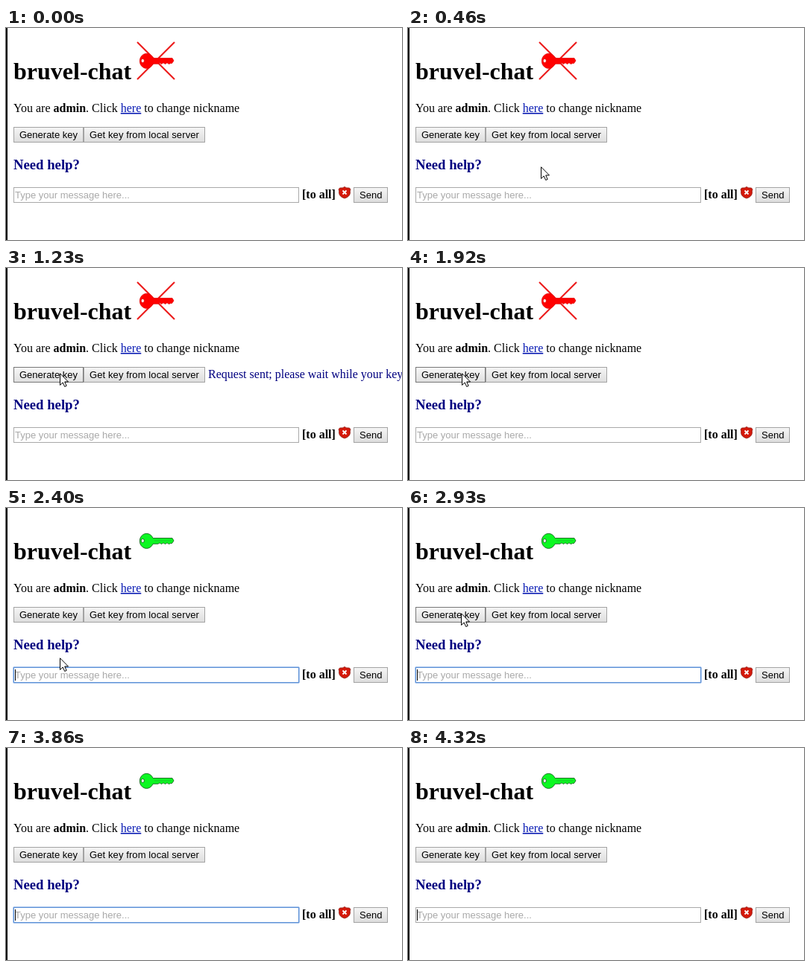
These frames come from a looping animation (531 px wide and 285 px high, 4.4 s). An HTML page:

```html
<!DOCTYPE html>
<html lang="en">
<head>
<meta charset="utf-8">
<title>Chat key demo</title>
<style>
  html, body { margin: 0; width: 100%; height: 100%; overflow: hidden; background: #fff; }
  svg { display: block; }
  text { font: 16px "Liberation Serif", "Times New Roman", serif; white-space: pre; }
  .bold { font-weight: bold; }
  .title { font-size: 32px; font-weight: bold; }
  .subtitle { font-size: 18.72px; font-weight: bold; }
  .navy { fill: #000080; }
  .link { fill: #0a1cb4; text-decoration: underline 1px; }
  .ui { font: 13px "Liberation Sans", Arial, sans-serif; }
  .wide { letter-spacing: .1px; }
  .hint { fill: #a9a9a9; }
  .button { fill: url(#face); stroke: #a3a3a3; }
  .button.hover { fill: url(#faceHover); stroke: #777; }
  .button.pressed { fill: url(#facePressed); stroke: #777; }
</style>
</head>
<body>
<svg width="531" height="285" viewBox="0 0 531 285">
  <defs>
    <linearGradient id="face" x2="0" y2="1"><stop stop-color="#f5f5f5"/><stop offset="1" stop-color="#dddddd"/></linearGradient>
    <linearGradient id="faceHover" x2="0" y2="1"><stop stop-color="#f8f8f8"/><stop offset="1" stop-color="#dfdfdf"/></linearGradient>
    <linearGradient id="facePressed" x2="0" y2="1"><stop stop-color="#d8d8d8"/><stop offset="1" stop-color="#ececec"/></linearGradient>
    <path id="key" fill-rule="evenodd"
      d="M197 40.500A9.200 10 0 1 0 197 48.200H204L206 46.800L208.500 48.500L211 46.800L213.500 48.500L216 46.800L218.500 48.500L220.500 47.500H222.500L225 44L223 40.500ZM183.300 41.500A2.100 2.500 0 1 0 183.300 46.500A2.100 2.500 0 1 0 183.300 41.500Z"/>
  </defs>
  <rect width="531" height="285" fill="#fff"/>
  <rect width="2" height="285"/>

  <text class="title" x="10" y="69">bruvel-chat</text>

  <g id="redKey">
    <path d="M176 19L226 69M226 19L176 69" stroke="#ec1c1c" stroke-width="2.1"/>
    <use href="#key" fill="#f00" stroke="#e00000" stroke-width=".7"/>
  </g>
  <g id="greenKey">
    <use href="#key" fill="#0cf822" stroke="#17651f" stroke-width=".9"/>
    <path d="M199 44H222" stroke="#17b82a" stroke-width=".7"/>
  </g>

  <text x="10" y="113">You are <tspan class="bold">admin</tspan>. Click <tspan class="link">here</tspan> to change nickname</text>

  <rect id="generate" class="button" x="10.5" y="133.5" width="93" height="20"/>
  <text class="ui" x="18" y="148">Generate key</text>
  <rect class="button" x="104.5" y="133.5" width="162" height="20"/>
  <text class="ui wide" x="112" y="148">Get key from local server</text>
  <text id="notice" class="navy" x="271" y="148">Request sent; please wait while your key</text>

  <text class="subtitle navy" x="10" y="190">Need help?</text>

  <rect x="10.5" y="214.5" width="382" height="20" fill="#fff" stroke="#a9a9a9"/>
  <g id="ring" fill="none">
    <rect x="9.5" y="213.5" width="384" height="22" rx="1.5" stroke="#a9c6ee"/>
    <rect x="10.5" y="214.5" width="382" height="20" stroke="#5f92d6"/>
  </g>
  <text class="ui hint" x="12" y="229">Type your message here...</text>
  <rect id="caret" x="12" y="217" width="1" height="15"/>

  <text class="bold" x="397" y="229">[to all]</text>
  <path fill="#d5190b" stroke="#8e1a12" stroke-width=".8"
    d="M454 213.500Q456 215.500 460.500 215L462 217Q460.800 219 461.500 221.500Q461 227 454 229Q447 227 446.500 221.500Q447.200 219 446 217L447.500 215Q452 215.500 454 213.500Z"/>
  <path d="M451.500 218.500L456.500 223.500M456.500 218.500L451.500 223.500" stroke="#fff" stroke-width="1.800"/>
  <rect class="button" x="466.5" y="214.5" width="45" height="20"/>
  <text class="ui" x="474" y="229">Send</text>

  <path id="cursor" d="M.5 .8V16.500L4.200 13L6.700 18.500L9.200 17.400L6.700 12H11.500Z" fill="#fff" stroke="#000" stroke-linejoin="round"/>
</svg>
<script>
  const LOOP = 4400;
  const part = id => document.getElementById(id);
  const show = (id, on) => { part(id).style.display = on ? "" : "none"; };
  const between = (t, from, to) => t >= from && t < to;

  // [start ms, x, y]; no position means the pointer is off stage
  const pointerSteps = [
    [0],
    [230, 390, 270], [300, 335, 247], [380, 258, 217], [460, 178, 186],
    [540, 112, 160], [610, 82, 146], [690, 72, 141],
    [2300, 72, 165], [2400, 72, 201], [2850, 72, 172], [2930, 71, 141],
    [3620, 116, 160], [3700, 226, 205], [3780, 369, 263],
    [3860]
  ];

  function draw(t) {
    const [, x, y] = pointerSteps.findLast(step => step[0] <= t);
    const visible = x !== undefined;
    show("cursor", visible);
    if (visible) part("cursor").setAttribute("transform", `translate(${x} ${y})`);

    const hover = visible && x >= 10 && x < 104 && y >= 133 && y < 154;
    const pressed = between(t, 1160, 1230);
    part("generate").setAttribute("class", "button" + (pressed ? " pressed" : hover ? " hover" : ""));

    const hasKey = t >= 2300;
    show("redKey", !hasKey);
    show("greenKey", hasKey);
    show("notice", between(t, 1230, 1920));
    show("ring", between(t, 2300, 4320));
    show("caret", hasKey);
  }

  const start = performance.now();
  function tick() {
    draw((performance.now() - start) % LOOP);
    requestAnimationFrame(tick);
  }
  tick();
</script>
</body>
</html>
```
